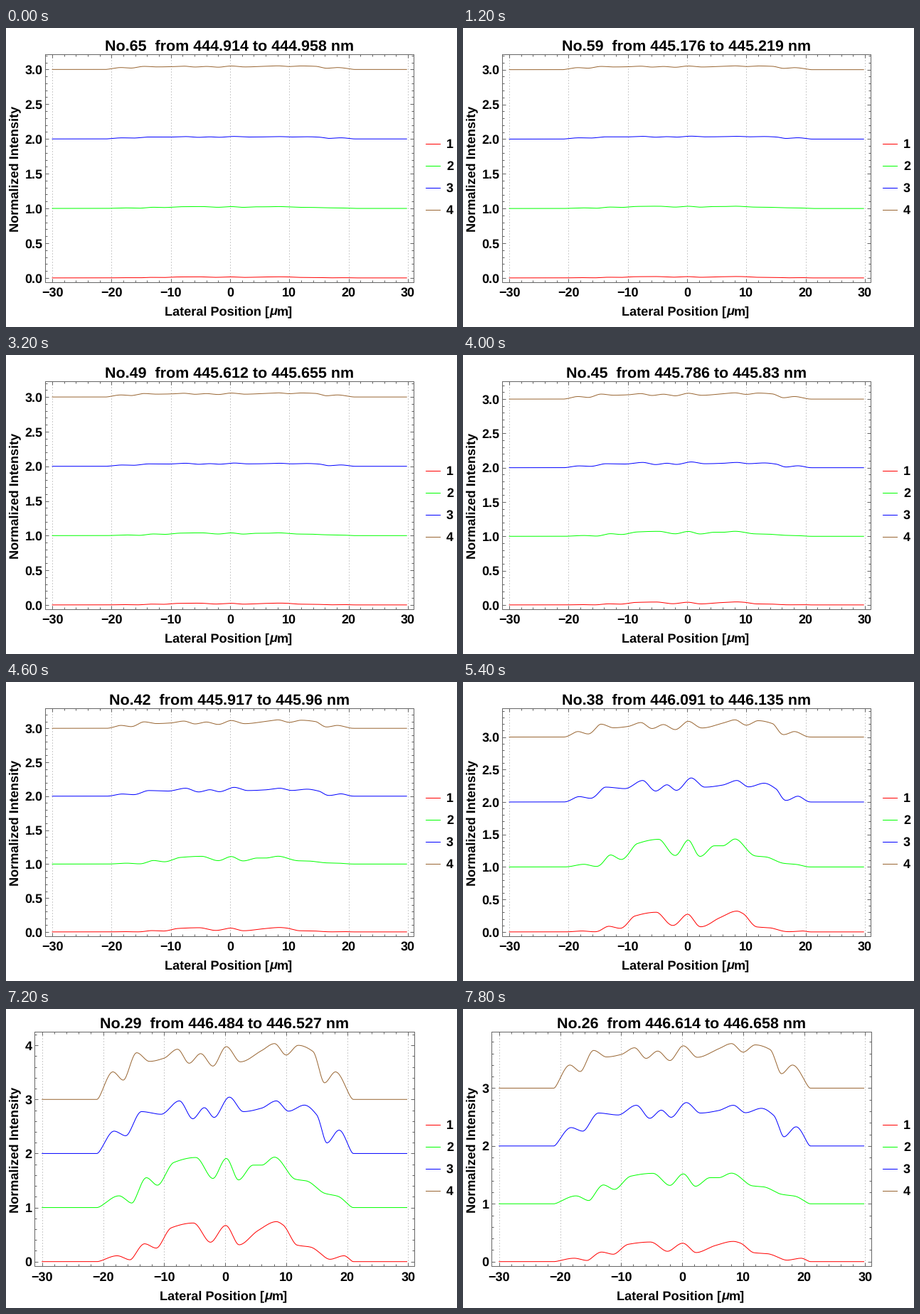
Write a matplotlib script that moves like this. It is 634 px wide and 421 px high and loops after 8000 ms.

```python
import numpy as np
import matplotlib.pyplot as plt
from matplotlib.animation import FuncAnimation
from matplotlib.collections import LineCollection

plt.rcParams["text.hinting"] = "none"

W, H, DPI = 634, 421, 100
PX = 72 / DPI
FRAMES, STEP = 40, 200
FIRST_NO, FIRST_NM, WIDTH_NM = 65, 444.914, 0.0436

INK, EDGE = "black", "#666666"
COLORS = ["#ff0000", "#00ff00", "#0000ff", "#996633"]
XS = np.linspace(-30, 29.8, 500)

# Crests and troughs (position, height) of each curve.
RED = [(-17.7, 6), (-15.6, 1.5), (-13.2, 23), (-11.3, 16.5), (-8.8, 50),
       (-5.2, 58.5), (-2.4, 25.5), (0.1, 54), (2.3, 21.5), (5.4, 45),
       (8.4, 61), (9.5, 55), (11.8, 21), (14, 18), (17.2, 2), (19.5, 6)]
GREEN = [(-17.4, 11), (-15.3, 3.5), (-12.9, 34), (-11.1, 24), (-8.4, 56),
         (-4.8, 63.5), (-2, 33), (0.2, 62), (2.2, 31), (4.6, 52), (6, 52),
         (8.1, 64), (11.5, 32), (13.4, 29.5), (16.3, 14), (18.5, 10.5)]
BLUE = [(-18.2, 18.5), (-16.3, 14), (-13.7, 39.5), (-10.5, 36.5), (-7.5, 52),
        (-5.3, 31.5), (-3.4, 44), (-1.8, 33), (0.7, 56.5), (3, 39.5),
        (6, 43.5), (8.4, 52), (10.4, 40), (13, 47), (15, 36), (16.7, 7.5),
        (18.7, 19.5)]
BROWN = [(-18.4, 23), (-16.7, 15), (-14.5, 43.5), (-12.4, 34), (-10, 37.5),
         (-7.8, 47.5), (-5.9, 32), (-4, 42.5), (-2, 29), (0.2, 50.5),
         (2.5, 33.5), (6, 46), (8.1, 54), (10, 41), (12, 52), (14.4, 45),
         (16.3, 12.5), (18.1, 23)]
SHAPES = [RED, GREEN, BLUE, BROWN]

# Peak height of each curve at a few numbers.
STAGES = [26, 32, 38, 42, 49, 59, 65]
PEAKS = [
    [0.35, 0.61, 0.32, 0.065, 0.026, 0.020, 0.016],
    [0.53, 0.64, 0.43, 0.115, 0.040, 0.033, 0.027],
    [0.75, 0.565, 0.37, 0.13, 0.047, 0.042, 0.036],
    [0.77, 0.54, 0.265, 0.125, 0.060, 0.055, 0.052],
]

# Wide tick labels (halves) and narrow ones (whole numbers).
HALVES = dict(left=55, right=573, top=37, bottom=358, x0=315, sx=8.33,
              major=0.5, minor=0.1, fmt="{:.1f}", title=32, ticks=377.5,
              label=404)
WHOLES = dict(left=40, right=574, top=32, bottom=362, x0=308, sx=8.575,
              major=1.0, minor=0.2, fmt="{:.0f}", title=27, ticks=382.5,
              label=409)
TOP_FOR_WHOLES = 3.6


def smooth(xk, yk, x):
    """Monotone cubic through the knots, flat at every turning point."""
    h = np.diff(xk)
    d = np.diff(yk) / h
    m = np.zeros(len(xk))
    prod = d[:-1] * d[1:]
    up = prod > 0
    m[1:-1][up] = 2 * prod[up] / (d[:-1] + d[1:])[up]
    i = np.clip(np.searchsorted(xk, x) - 1, 0, len(h) - 1)
    t = (x - xk[i]) / h[i]
    return (yk[i] * (1 + 2 * t) * (1 - t) ** 2 + yk[i + 1] * t * t * (3 - 2 * t)
            + h[i] * t * (1 - t) * (m[i] * (1 - t) - m[i + 1] * t))


def unit_shape(points):
    xk, yk = np.array([(-30, 0), (-21, 0), *points, (21, 0), (30, 0)]).T
    return np.clip(smooth(xk, yk / yk.max(), XS), 0, 1)


UNITS = [unit_shape(s) for s in SHAPES]


def curve(k, no):
    """Curve k: exponential growth, pulsing after onset, varying contrast."""
    peak = np.exp(np.interp(no, STAGES, np.log(PEAKS[k])))
    if no < 38:
        peak *= 1 + 0.6 * np.sin(np.pi * (no - 26) / 6) ** 2
    contrast = 0.75 + 0.6 * np.exp(-((no - 39) / 7) ** 2)
    return k + peak * UNITS[k] ** contrast


fig = plt.figure(figsize=(W / DPI, H / DPI), dpi=DPI, facecolor="white")
ax = fig.add_axes([0, 0, 1, 1])


def put(x, y, text, size=18, ha="center", **kw):
    ax.text(x, y, text, fontsize=size * PX, ha=ha, va="baseline", color=INK,
            family="Liberation Sans", weight="bold", **kw)


def draw_frame(lay, to_y, high):
    l, r, t, b = (lay[s] for s in ("left", "right", "top", "bottom"))
    ticks = []
    for v in range(-30, 31, 2):
        x = lay["x0"] + lay["sx"] * v
        n = 3
        if v % 10 == 0:
            n = 5
            ax.plot([x, x], [b, t], color="#999999", lw=PX, ls=(0, (1, 3)),
                    dash_capstyle="butt", zorder=1)
            put(x, lay["ticks"], str(v).replace("-", "\u2212"))
        ticks += [[(x, b), (x, b - n)], [(x, t), (x, t + n)]]
    per = round(lay["major"] / lay["minor"])
    for j in range(int(high / lay["minor"]) + 1):
        v = j * lay["minor"]
        y = to_y(v)
        n = 3
        if j % per == 0:
            n = 5
            put(l - 3.5, y + 6.5, lay["fmt"].format(v), ha="right")
        ticks += [[(l, y), (l + n, y)], [(r, y), (r - n, y)]]
    ax.add_collection(LineCollection(ticks, colors=EDGE, linewidths=PX,
                                     zorder=3))
    ax.plot([l, r, r, l, l], [t, t, b, b, t], color=EDGE, lw=PX, zorder=3)


def draw_labels(lay, no):
    mid = (lay["left"] + lay["right"]) / 2
    nm = FIRST_NM + (FIRST_NO - no) * WIDTH_NM
    put(mid, lay["title"],
        f"No.{no}  from {nm:.6g} to {nm + WIDTH_NM:.6g} nm", 21.5)
    y = lay["label"]
    put(mid + 56.5, y, "Lateral Position [", 18.2, "right")
    put(mid + 56.5, y, "\u03bc", 18.2, "left", style="italic")
    put(mid + 67, y, "m]", 18.2, "left")
    put(17, 198, "Normalized Intensity", 18.2, rotation=90,
        rotation_mode="anchor")
    for k, color in enumerate(COLORS):
        y = 163 + 31 * k
        ax.plot([590, 610], [y, y], color=color, lw=PX)
        put(624, y + 6, str(k + 1))


def draw(i):
    ax.cla()
    ax.set(xlim=(0, W), ylim=(H, 0))
    ax.axis("off")
    no = FIRST_NO - i
    ys = [curve(k, no) for k in range(4)]
    peak = max(y.max() for y in ys)
    low, high = -0.0205 * peak, 1.0545 * peak
    lay = WHOLES if peak > TOP_FOR_WHOLES else HALVES
    scale = (lay["bottom"] - lay["top"]) / (high - low)

    def to_y(v):
        return lay["bottom"] - (v - low) * scale

    draw_frame(lay, to_y, high)
    for y, color in zip(ys, COLORS):
        ax.plot(lay["x0"] + lay["sx"] * XS, to_y(y), color=color, lw=PX,
                zorder=2)
    draw_labels(lay, no)
    return []


anim = FuncAnimation(fig, draw, frames=FRAMES, interval=STEP,
                     init_func=lambda: [], repeat=True, repeat_delay=0)
plt.show()
```
